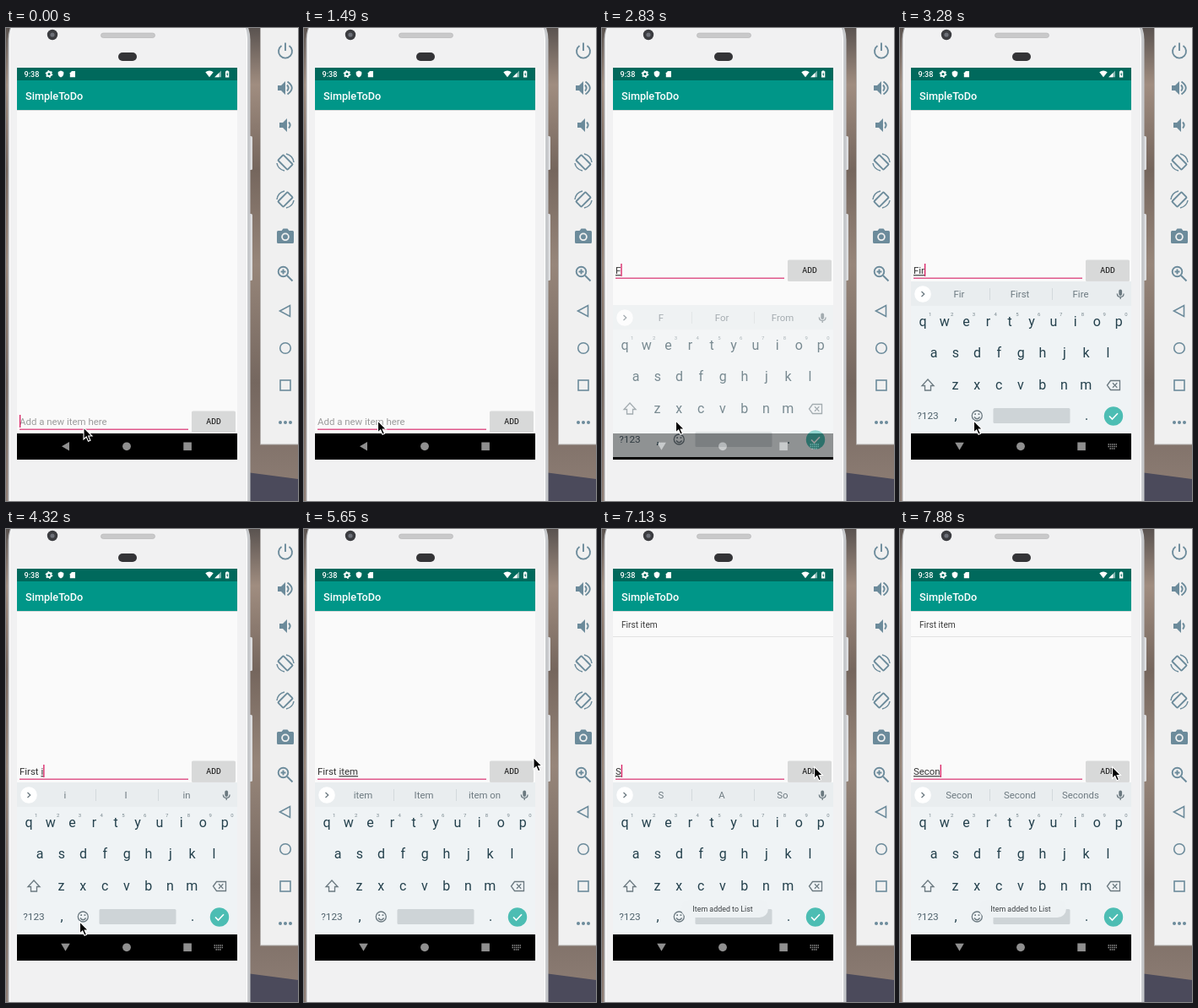
Write an HTML page that moves like this. It is 346 by 560 pixels and loops after 8 s.

```html
<!DOCTYPE html>
<html lang="en">
<head>
<meta charset="utf-8">
<title>SimpleToDo</title>
<style>
html, body { margin: 0; width: 100%; height: 100%; overflow: hidden; background: #8a7a6e; }
svg { display: block; width: 346px; height: 560px; font-family: Roboto, sans-serif; }
text { white-space: pre; }
.mid { text-anchor: middle; }
.edit { font-size: 11.43px; }
.key { font-size: 16px; fill: #24414d; }
.hint { font-size: 6px; fill: #77868d; }
.sug { font-size: 11.4px; fill: #6d7a81; }
.line { fill: none; stroke: #6b7980; stroke-width: 1.3; }
.tool { fill: none; stroke: #6c8b9b; stroke-width: 1.9; }
.tool .f { fill: #6c8b9b; stroke: none; }
#word { text-decoration: underline; }
</style>
</head>
<body>
<svg viewBox="0 0 346 560">
  <defs>
    <linearGradient id="stone" x2="0" y2="1">
      <stop offset="0" stop-color="#5a5350"/><stop offset=".12" stop-color="#a08d80"/>
      <stop offset=".3" stop-color="#75665d"/><stop offset=".5" stop-color="#97867a"/>
      <stop offset=".75" stop-color="#75675f"/><stop offset="1" stop-color="#8f7f76"/>
    </linearGradient>
    <clipPath id="screen"><rect x="13" y="47" width="261" height="464"/></clipPath>
  </defs>

  <rect width="346" height="560" fill="url(#stone)"/>
  <path d="M270 524L346 534V560H270Z" fill="#4b4a5b"/>

  <!-- phone body -->
  <g fill="#dcdddf">
    <rect x="287" y="128" width="5" height="40" rx="1.5"/>
    <rect x="287" y="220" width="5" height="79" rx="1.5"/>
  </g>
  <rect x="2.5" y="-30" width="287" height="640" rx="44" fill="#c6c8cb"/>
  <rect x="4.5" y="-29" width="281" height="638" rx="42" fill="#f1f1f2" stroke="#fff"/>
  <circle cx="55" cy="8" r="6.2" fill="#3b3c40"/>
  <circle cx="55" cy="8" r="2.6" fill="#6d7078"/>
  <rect x="112.500" y="6" width="64" height="5.500" rx="2.700" fill="#c9c9ca" stroke="#b2b2b3" stroke-width=".6"/>
  <rect x="133" y="29" width="22" height="10" rx="5" fill="#343437"/>

  <!-- app -->
  <rect x="13" y="47" width="261" height="464" fill="#fafafa"/>
  <rect x="13" y="47" width="261" height="15" fill="#00695c"/>
  <rect x="13" y="62" width="261" height="35" fill="#009688"/>
  <path d="M13 97.500H274" stroke="#d5d9d9"/>
  <g fill="#fff">
    <text x="21.500" y="57.700" font-size="9.100" font-weight="500">9:38</text>
    <circle cx="51" cy="54.500" r="2.500" fill="none" stroke="#fff" stroke-width="1.800"/>
    <circle cx="51" cy="54.500" r="3.800" fill="none" stroke="#fff" stroke-width="1.200" stroke-dasharray="1.700 2.280"/>
    <path d="M65 50.500L68.300 52V54.500Q68 57.500 65 58.600Q62 57.500 61.700 54.500V52Z"/>
    <path d="M78 51H82V58.200H75.800V53.200Z"/>
    <path d="M236.300 52.300Q241 48.800 245.700 52.300L241 58.300Z"/>
    <path d="M255 50.500V58.300H247.200Z" opacity=".5"/><path d="M252.500 53V58.300H247.200Z"/>
    <path d="M260 51.200H261V50.400H263.300V51.200H264.300V58.500H260Z"/>
    <path d="M262.500 52.300L261 55.200H262V57.300L263.400 54.500H262.500Z" fill="#00695c"/>
    <text x="23" y="84.500" font-size="12.700" font-weight="500">SimpleToDo</text>
  </g>
  <g id="item">
    <text x="23" y="116.600" font-size="10.160" fill="#3c3c3c">First item</text>
    <path d="M13 127.500H274" stroke="#e2e2e2"/>
  </g>
  <g id="row">
    <path d="M16 475.200H216" stroke="#e0598c" stroke-width="1.500"/>
    <rect x="220" y="454.500" width="52" height="24.500" rx="1.500" fill="#c6c7c7" opacity=".6"/>
    <rect x="220" y="453.500" width="52" height="24.500" rx="1.500" fill="#d8d9d9"/>
    <text class="mid" x="246" y="468.500" font-size="8.900" font-weight="500" fill="#2b2b2b">ADD</text>
    <text id="empty" class="edit" x="16" y="470.200" fill="#9c9c9c">Add a new item here</text>
    <text id="text" class="edit" x="16" y="470.200" fill="#333"><tspan id="done"></tspan><tspan id="word"></tspan></text>
    <rect id="caret" y="458" width="1.300" height="15" fill="#d81b60"/>
  </g>
  <rect x="13" y="480" width="261" height="31"/>
  <g fill="#8f8f8f">
    <path id="back" d="M66 495.300L75 490V500.600Z"/>
    <circle cx="143" cy="495.300" r="4.900"/>
    <rect x="210.300" y="490.500" width="9.600" height="9.600"/>
    <path id="switch" d="M246.500 493H257M246.500 495.500H257M248.500 498H255" fill="none" stroke="#8f8f8f" stroke-width="1.500" stroke-dasharray="1.500 .8"/>
  </g>

  <g clip-path="url(#screen)"><g id="keyboard">
    <rect x="13" y="300" width="261" height="180" fill="#eff3f5"/>
    <rect x="13" y="300" width="261" height="29" fill="#e9edef"/>
    <circle cx="27" cy="315" r="9.800" fill="#fff"/>
    <path class="line" d="M25.500 312L28.700 315L25.500 318"/>
    <path d="M106.500 308V322M180.500 308V322" stroke="#d3d9dc"/>
    <g id="sugs"></g>
    <rect x="259.300" y="309.500" width="3.800" height="7.500" rx="1.900" fill="#6b7980"/>
    <path class="line" d="M257.300 314.500Q257.500 318.500 261.200 318.500Q264.900 318.500 265.100 314.500M261.200 318.500V321"/>
    <g id="keys"></g>
    <path class="line" d="M33 416L40 423.500H36.500V429H29.500V423.500H26Z"/>
    <path class="line" d="M245.500 423L249.500 417.500H260.500V428.500H249.500ZM252 420.300L257.300 425.700M257.300 420.300L252 425.700"/>
    <text class="mid" x="33" y="463.200" font-size="11.800" fill="#4f626c">?123</text>
    <text class="key mid" x="66" y="464">,</text>
    <text class="key mid" x="221" y="464">.</text>
    <circle class="line" cx="91.300" cy="459" r="6"/>
    <path class="line" d="M88 460.500Q91.300 465 94.600 460.500"/>
    <path d="M88.300 457.200H90M92.600 457.200H94.300" stroke="#6b7980" stroke-width="1.700"/>
    <rect x="110.500" y="450" width="91" height="18" rx="1.500" fill="#ced4d7"/>
    <circle cx="253" cy="459.500" r="11.200" fill="#4cbdb3"/>
    <path d="M248 459.500L251.500 463L258 456.300" fill="none" stroke="#fff" stroke-width="1.600"/>
  </g></g>
  <g id="toast">
    <rect x="94" y="439" width="103" height="21" rx="10.500" fill="#eef2f4"/>
    <text class="mid" x="143" y="453.200" font-size="8.890" fill="#3c4144">Item added to List</text>
  </g>

  <!-- side toolbar -->
  <rect x="301.500" y="-1" width="50" height="494" fill="#f0f0f0" stroke="#b3b0ae"/>
  <g class="tool">
    <path d="M326.500 21A8 8 0 1 0 335.500 21M331 17.500V27"/>
    <path class="f" d="M322 68H326L331 63V79L326 74H322Z"/>
    <path d="M333 67.500Q336.300 71 333 74.500M333.500 63.500Q344 71 333.500 78.500"/>
    <path class="f" d="M324 112H328L333 107V123L328 118H324Z"/><path d="M335 111.500Q338.300 115 335 118.500"/>
    <g id="turn">
      <rect x="-4.500" y="-8" width="9" height="16" rx="1" transform="rotate(-45)"/>
      <path d="M-10 1Q-9 8 -1 10M1 -10Q9 -8 10 0" stroke-width="1.500"/>
    </g>
    <use href="#turn" transform="matrix(-1 0 0 1 662 44)"/>
    <path class="f" d="M322.500 240H326.500L328.500 237.500H333.500L335.500 240H339.500Q341 240 341 241.500V253.500Q341 255 339.500 255H322.500Q321 255 321 253.500V241.500Q321 240 322.500 240Z"/>
    <circle cx="331" cy="247.300" r="3.900" fill="none" stroke="#f0f0f0" stroke-width="1.800"/>
    <circle cx="328.500" cy="288.500" r="5.800"/>
    <path d="M333 293L339.500 299.500M325.500 288.500H331.500M328.500 285.500V291.500"/>
    <path d="M324.500 335L336.500 328.500V341.500Z" stroke-width="1.600"/>
    <circle cx="331" cy="379" r="6.300" stroke-width="1.600"/>
    <rect x="325" y="417" width="12" height="12" stroke-width="1.600"/>
    <g class="f"><circle cx="325" cy="467" r="2"/><circle cx="331" cy="467" r="2"/><circle cx="337" cy="467" r="2"/></g>
  </g>

  <path id="cursor" d="M0 0V14L3.200 11L5.500 16.300L8 15.200L5.700 10H10Z" stroke="#fff" stroke-width="1.100"/>
</svg>
<script>
const $ = id => document.getElementById(id);
const LOOP = 8000;
const show = (id, on) => $(id).style.display = on ? "" : "none";

function label(parent, cls, x, y, str = "") {
  const el = document.createElementNS("http://www.w3.org/2000/svg", "text");
  el.setAttribute("class", cls + " mid");
  el.setAttribute("x", x);
  el.setAttribute("y", y);
  el.textContent = str;
  return $(parent).appendChild(el);
}

[["qwertyuiop", 27, 353], ["asdfghjkl", 40, 390], ["zxcvbnm", 65.5, 427.5]].forEach(([row, x, y], r) =>
  [...row].forEach((c, i) => {
    label("keys", "key", x + 25.8 * i, y, c);
    if (r === 0) label("keys", "hint", x + 8.8 + 25.8 * i, 340.5, (i + 1) % 10);
  }));
const sugs = [70, 142, 214].map(x => label("sugs", "sug", x, 319));
$("turn").setAttribute("transform", "translate(331 159)");

// Each track holds [start, value] steps.
const typed = [
  [0, "", ""], [2830, "F", "F|For|From"], [2980, "Fi", "Fi|Find|Fine"],
  [3280, "Fir", "Fir|First|Fire"], [3430, "First", "First|Firstly|First time"],
  [3730, "First ", "of|time|one"], [4320, "First i", "i|I|in"],
  [4620, "First it", "it|It|its"], [4760, "First ite", "ite|item|items"],
  [4910, "First item", "item|Item|item on"], [6240, "", "I|The|I'm"],
  [7130, "S", "S|A|So"], [7430, "Se", "Se|See|Send"], [7580, "Sec", "Sec|Second|Sex".replace("Sex", "Secret")],
  [7730, "Seco", "Seco|Second|Seconds"], [7880, "Secon", "Secon|Second|Seconds"]
];
const blink = [[0, 1], [300, 0], [750, 1], [1340, 0], [1790, 1], [2240, 0], [2680, 1],
  [5350, 0], [5940, 1], [6540, 0], [7130, 1]];
const pointer = [[0, 92, 473], [1040, 91, 471], [1190, 89, 468], [1340, 87.5, 465],
  [5350, 110, 445], [5500, 205, 332], [5650, 272, 270.5], [5790, 260, 277], [5940, 251.5, 281.5]];
const slide = [[0, 0, 0], [2830, 0.6, 28], [2980, 1, 0]];
const toast = [[0, 0], [6240, 0.3], [6390, 0.75], [6540, 1]];

const at = (track, t) => track.findLast(step => step[0] <= t).slice(1);

function draw(t) {
  const [str, words] = at(typed, t);
  const [alpha, drop] = at(slide, t);
  const [x, y] = at(pointer, t);
  const open = alpha > 0;
  const cut = str.lastIndexOf(" ") + 1;

  $("done").textContent = str.slice(0, cut);
  $("word").textContent = str.slice(cut);
  show("empty", !str);
  show("caret", at(blink, t)[0]);
  $("caret").setAttribute("x", 16 + (str ? $("text").getComputedTextLength() : 0));
  words.split("|").forEach((w, i) => sugs[i].textContent = w);

  $("row").setAttribute("transform", `translate(0 ${open ? -179 : 0})`);
  $("keyboard").setAttribute("transform", `translate(0 ${drop})`);
  $("keyboard").setAttribute("opacity", alpha);
  $("back").setAttribute("transform", open ? "rotate(-90 70.5 495.3)" : "");
  show("switch", open);
  show("item", t >= 6240);
  $("toast").setAttribute("opacity", at(toast, t)[0]);
  $("cursor").setAttribute("transform", `translate(${x} ${y})`);
}

function tick() {
  draw(performance.now() % LOOP);
  requestAnimationFrame(tick);
}
tick();
</script>
</body>
</html>
```
